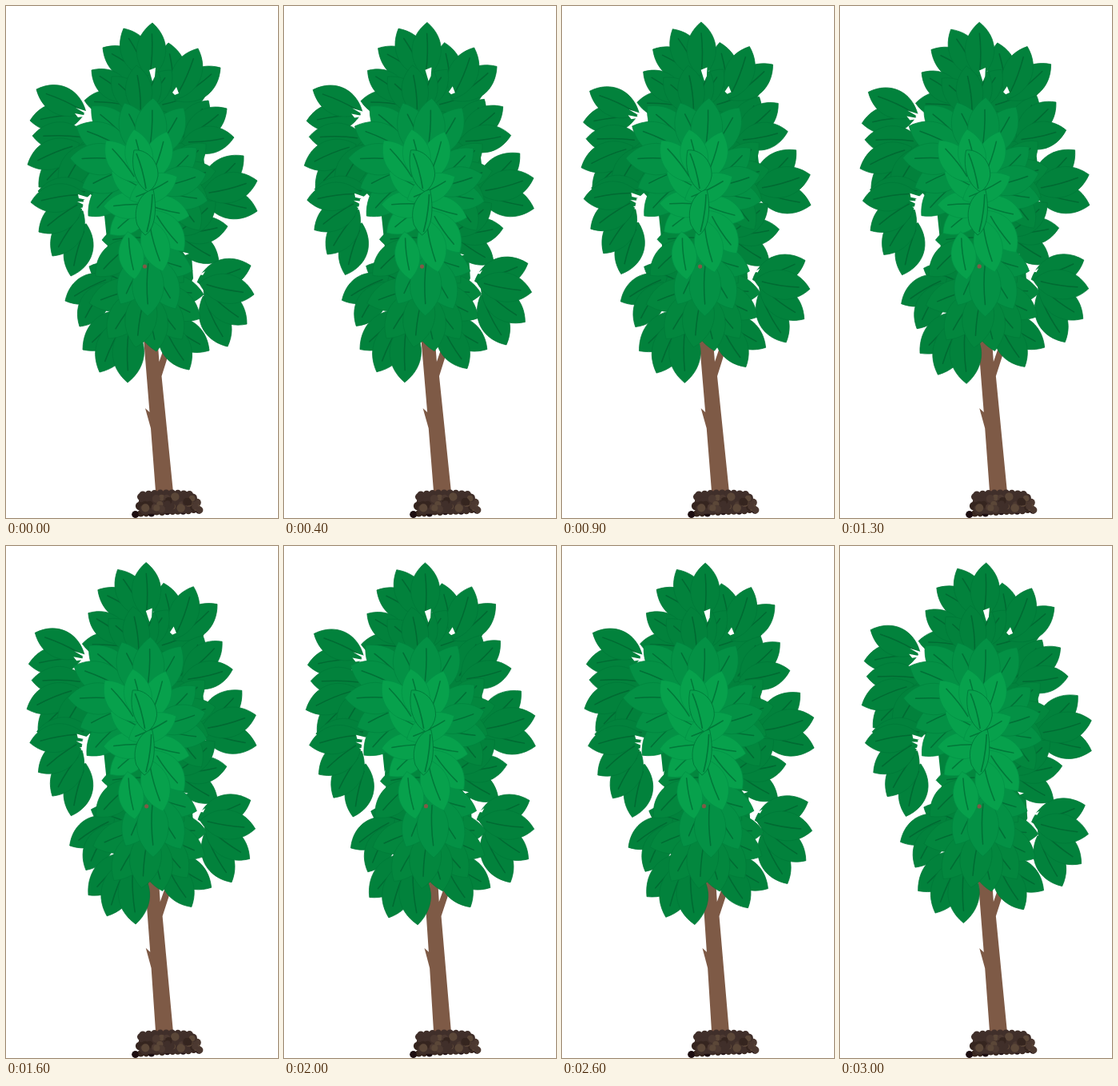
Write an HTML page that moves like this. It is 340 px wide and 639 px high and loops after 3.1 s.

```html
<!DOCTYPE html>
<html lang="en">
<head>
<meta charset="utf-8">
<title>Swaying tree</title>
<style>
html, body { margin: 0; width: 100%; height: 100%; overflow: hidden; background: #fff; }
svg { display: block; width: 100vw; height: 100vh; }
</style>
</head>
<body>
<svg id="stage" viewBox="0 0 340 639"></svg>
<script>
const LOOP = 3100, STEP = 100;
const stage = document.getElementById('stage');

// fill, edge and vein colours per depth
const TONES = {
  back: ['#02823c', '#017838', '#016a32'],
  inner: ['#03873e', '#027b39', '#016c33'],
  mid: ['#049145', '#02833e', '#017036'],
  front: ['#07a14c', '#039246', '#017839']
};

// Pivot, leaf length, tone, early and late sway as [dx, dy, angle], leaf tips.
const clusters = [];
function cluster(x, y, len, tone, early, late, tips, gaps = []) {
  clusters.push({ x, y, len, tone, early, late, tips, gaps });
}

// crown
cluster(211, 118, 70, 'back', [-2.3, -1, -.05], [1.6, .7, -.045],
  [[203, 46], [253, 104], [268, 77], [240, 53]]);
cluster(180, 92, 70, 'back', [-5.5, -1, -.05], [.8, .7, -.015],
  [[121, 52], [147, 28], [183, 21]]);
cluster(168, 126, 64, 'back', [-4, 0, -.03], [1.5, 2, -.02],
  [[98, 118], [107, 80], [207, 80], [132, 88], [190, 82], [163, 74]],
  ['179 80 187 77 186 88 183 94', '208 108 213 101 216 109 211 111']);
// left side
cluster(104, 134, 68, 'back', [-3.5, 2, 0], [2, 4, 0],
  [[30, 143], [38, 104]],
  ['87 127 103 132 111 136 99 134', '86 134 102 137 90 139', '92 142 111 140 110 146 98 145']);
cluster(110, 164, 70, 'back', [-3, 3.5, 0], [2.5, 4, 0],
  [[41, 226], [33, 162], [27, 198], [68, 230]]);
cluster(112, 232, 68, 'back', [-3.5, -1.3, .04], [2.4, .5, -.078],
  [[40, 231], [81, 337], [58, 312], [41, 282], [31, 245]],
  ['90 235 103 239 101 242 91 240', '89 244 105 245 97 248', '93 252 106 250 101 257',
   '107 267 115 274 106 277', '109 283 117 277 114 288', '117 290 124 281 123 290']);
// right side
cluster(215, 171, 66, 'back', [-2, -1.5, -.08], [1.9, -1, -.075],
  [[253, 118], [276, 128], [285, 164]]);
cluster(242, 236, 72, 'back', [-3.5, -6, -.02], [2.5, -1, 0],
  [[297, 187], [314, 256], [314, 218]]);
cluster(213, 284, 66, 'back', [-6, 2, .03], [6, -3, -.03],
  [[266, 319], [277, 275], [262, 244]], ['221 307 229 309 224 311']);
cluster(238, 345, 70, 'back', [-1, -3, -.05], [2.7, -1, -.015],
  [[277, 425], [301, 397], [306, 324], [310, 360]],
  ['242 335 249 331 246 336', '240 404 248 410 243 407']);
// foot of the crown
cluster(190, 387, 70, 'back', [0, -3, -.01], [3.5, -1, 0],
  [[254, 430], [229, 454]]);
cluster(132, 338, 66, 'back', [-1.5, -.2, -.01], [7, 3, -.1],
  [[104, 325], [74, 368], [92, 400]]);
cluster(154, 382, 76, 'back', [-.7, .2, -.015], [5.5, 3, -.105],
  [[96, 429], [117, 457], [152, 470]]);
// inner foliage
cluster(176, 350, 76, 'inner', [.5, -.5, -.02], [5, 1, -.05],
  [[104, 371], [247, 360], [128, 415], [243, 390], [220, 416], [188, 431], [162, 426]]);
cluster(165, 290, 68, 'inner', [-1, 0, .02], [1, 0, -.05],
  [[120, 292], [112, 337], [222, 345]]);
cluster(200, 215, 64, 'inner', [-3, 0, -.02], [4, -4, -.03],
  [[250, 172], [262, 206], [252, 242], [242, 280]]);
// middle layer
cluster(178, 193, 76, 'mid', [0, 0, 0], [-4, -2, -.015],
  [[103, 262], [95, 227], [107, 125], [88, 150], [80, 190], [222, 127], [148, 121], [184, 115]]);
cluster(178, 310, 76, 'mid', [1, 0, 0], [6, 2, -.045],
  [[233, 331], [143, 372], [212, 378], [177, 387]]);
cluster(182, 228, 70, 'mid', [-3, 0, .01], [2.5, -3, -.02],
  [[238, 177], [252, 243], [250, 210]]);
// front layer
cluster(178, 248, 64, 'front', [0, 0, .07], [0, 0, -.094],
  [[130, 285], [122, 250], [229, 262], [222, 306]]);
cluster(175, 232, 66, 'front', [-1, 0, 0], [-.5, -.7, -.005],
  [[132, 207], [125, 168], [201, 157], [160, 154], [214, 213]]);
cluster(173, 250, 68, 'front', [0, 0, .07], [0, 0, -.094], [[196, 331]]);
cluster(149, 260, 60, 'front', [-2, 0, .04], [2, 0, -.06], [[161, 341]]);

function leaf(len, tone, x, y, angle, wide = .27) {
  const [fill, edge, vein] = TONES[tone];
  const w = len * wide * 1.28, a = len * .28, b = len * .72;
  return `<g transform="translate(${x} ${y}) rotate(${angle})">
    <path d="M0 0C${a} ${-w} ${b} ${-w} ${len} 0C${b} ${w} ${a} ${w} 0 0Z" fill="${fill}" stroke="${edge}" stroke-width=".7"/>
    <path d="M${len * .14} 0Q${len * .45} ${len * .035} ${len * .8} 0" fill="none" stroke="${vein}" stroke-width="1.5" stroke-linecap="round"/></g>`;
}

function drawCluster(c) {
  const leaves = c.tips.map(([tx, ty]) => {
    const a = Math.atan2(ty - c.y, tx - c.x);
    return leaf(c.len, c.tone, tx - c.len * Math.cos(a), ty - c.len * Math.sin(a), a * 180 / Math.PI);
  });
  const gaps = c.gaps.map(p => `<polygon points="${p}" fill="#fff"/>`);
  return `<g class="sway">${leaves.join('')}${gaps.join('')}</g>`;
}

// two single leaves at the very front
const curl = `<g class="sway">
  <path d="M160 180C174 178 191 192 190 212Q188 225 178 232C164 225 155 204 160 180Z" transform="translate(0 0)" fill="#07a14c" stroke="#017839" stroke-width=".9"/>
  <path d="M163 184Q171 203 175 228" fill="none" stroke="#017839" stroke-width="1.6"/>
  <path d="M184 229C168 232 158 253 164 273Q168 281 174 286C187 278 189 252 184 229Z" fill="#07a14c" stroke="#017839" stroke-width=".9"/>
  <path d="M183 235Q182 261 176 282" fill="none" stroke="#017839" stroke-width="1.6"/></g>`;
const curlSway = { x: 175, y: 250, early: [-3, 0, 0], late: [2, 0, -.01] };

const trunk = `<g class="sway">
  <path d="M187.500 612L181 527L174 502L179.500 507L172 415L168 330L186 330L190 424L191.500 444L197 428L204 432L194.500 462L209.500 612Z" fill="#7e5a46"/></g>`;
const trunkSway = { x: 198, y: 606, early: [0, 0, -.004], late: [0, 0, .017] };

const core = `<g class="sway">
  <path d="M112 140L165 92L176 100L205 116L243 155L252 230L230 282L234 340L205 395L150 405L112 350L127 300L122 252L82 210L78 170Z" fill="#02823c"/></g>`;
const coreSway = { x: 180, y: 300, early: [-2, 0, 0], late: [2, 0, 0] };

function soil() {
  let seed = 11;
  const rnd = () => (seed = (seed * 16807) % 2147483647) / 2147483647;
  const dot = (x, y, r, fill) => `<circle cx="${x}" cy="${y}" r="${r}" fill="${fill}"/>`;
  let out = '';
  for (let i = 0; i < 13; i++) {
    out += dot(162 + i * 6.6, 634.500 - i * .4 - rnd() * 2, 4.300, i % 3 ? '#38261f' : '#1d0d10');
  }
  out += '<path d="M164 626L167 613L178 608L226 606L238 613L243 627L228 633L170 634Z" fill="#402f2a"/>';
  for (let i = 0; i < 9; i++) out += dot(171 + i * 7.300, 610 - Math.sin(i / 8 * 3) * 2, 4.600, '#402f2a');
  const shades = ['#402f2a', '#5b4738', '#4c3931', '#35251f'];
  for (let i = 0; i < 38; i++) {
    out += dot(167 + rnd() * 72, 612 + rnd() * 18, 3.500 + rnd() * 1.800, shades[i % 4]);
  }
  return out + dot(161.500, 634.500, 4.300, '#1d0d10') + dot(242, 629, 4.400, '#4c3931');
}

// a speck of trunk showing between the leaves
const speck = '<circle cx="173.500" cy="325" r="2.600" fill="#7e5a46"/>';

const firstInner = clusters.findIndex(c => c.tone === 'inner');
const backParts = clusters.slice(0, firstInner), foreParts = clusters.slice(firstInner);
stage.innerHTML = trunk + core + backParts.map(drawCluster).join('') +
  foreParts.map(drawCluster).join('') + curl + `<g class="sway">${speck}</g>` + soil();

const speckSway = { x: 198, y: 606, early: [0, 0, -.004], late: [0, 0, .017] };
const movers = [trunkSway, coreSway, ...backParts, ...foreParts, curlSway, speckSway];
const nodes = [...document.querySelectorAll('.sway')];

const TIMES = [0, 400, 900, 1600, 2000, 2600];
const EARLY = [0, .45, 1, .85, .7, .4];
const LATE = [0, -.1, .05, .65, 1, .93];

// periodic cubic through the key values
function curve(keys, t) {
  const n = TIMES.length;
  const time = i => TIMES[(i + n) % n] + Math.floor(i / n) * LOOP;
  const val = i => keys[(i + n) % n];
  const slope = i => (val(i + 1) - val(i - 1)) / (time(i + 1) - time(i - 1));
  let i = n - 1;
  while (t < TIMES[i]) i--;
  const h = time(i + 1) - time(i), s = (t - time(i)) / h, r = 1 - s;
  return r * r * (1 + 2 * s) * val(i) + s * s * (3 - 2 * s) * val(i + 1) +
    h * s * r * (r * slope(i) - s * slope(i + 1));
}

function render(ms) {
  const t = Math.floor((ms % LOOP) / STEP) * STEP;
  const e = curve(EARLY, t), l = curve(LATE, t);
  movers.forEach((m, i) => {
    const [dx, dy, a] = m.early.map((v, k) => v * e + m.late[k] * l);
    nodes[i].setAttribute('transform',
      `translate(${dx.toFixed(2)} ${dy.toFixed(2)}) rotate(${(a * 180 / Math.PI).toFixed(3)} ${m.x} ${m.y})`);
  });
}

const start = performance.now();
function tick() {
  render(performance.now() - start);
  requestAnimationFrame(tick);
}
tick();
</script>
</body>
</html>
```
